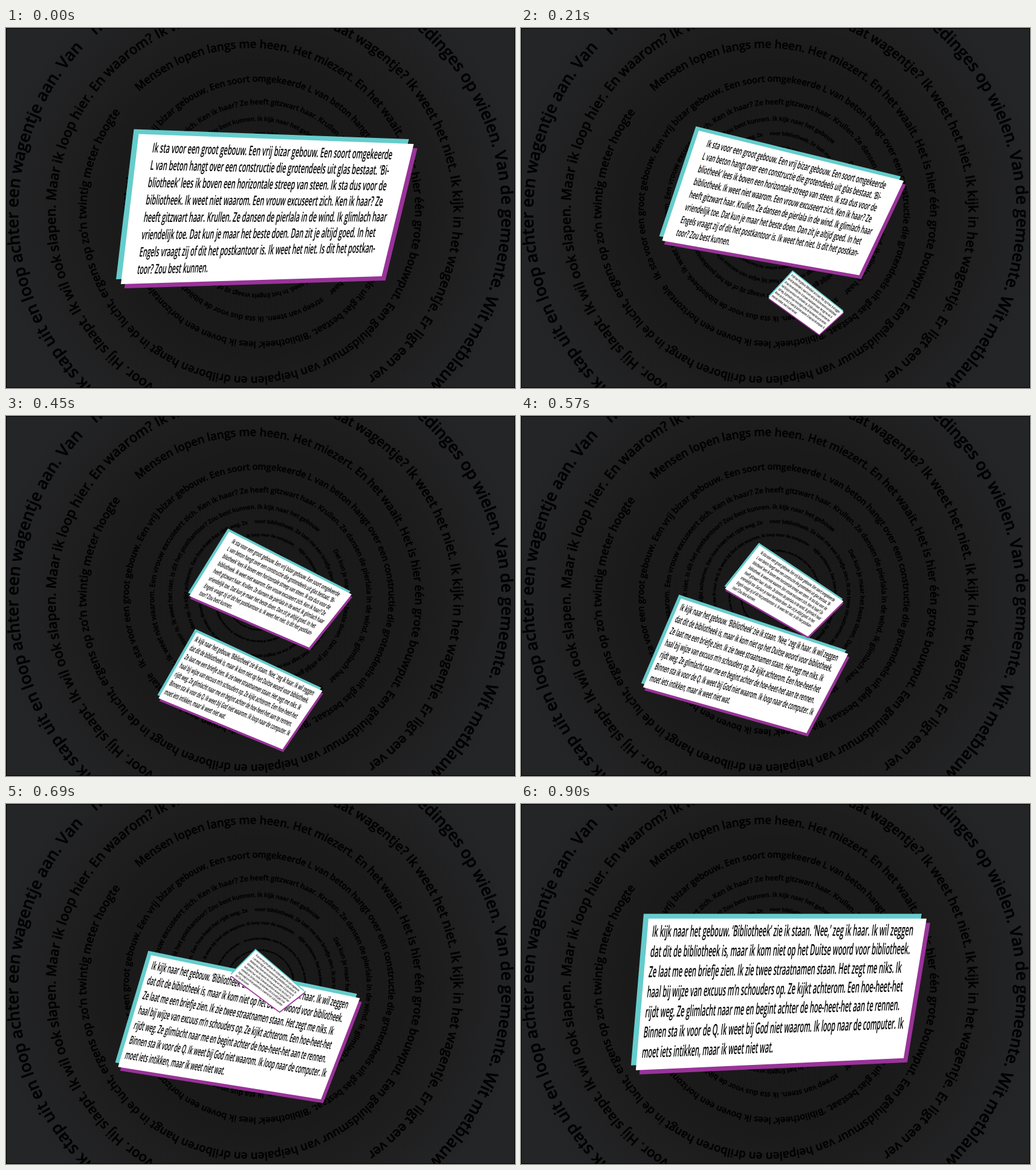
Animation, 842 px wide and 596 px high, one loop 0.93 s. Source, as an HTML page with a canvas:

```html
<!DOCTYPE html>
<html lang="nl">
<head>
<meta charset="utf-8">
<style>
  html, body { margin: 0; width: 100%; height: 100%; overflow: hidden; background: #1b1b1b; }
  canvas { display: block; }
</style>
</head>
<body>
<canvas id="stage" width="842" height="596"></canvas>
<script>
const W = 842, H = 596, STEP = 30, STEPS = 30, TURN = 50 * Math.PI / 180;
const FACE = '"Open Sans", "Noto Sans", sans-serif';
const stage = document.getElementById('stage').getContext('2d');
const backdrop = document.createElement('canvas');
backdrop.width = W;
backdrop.height = H;

const mix = (a, b, t) => a.map((v, i) => v + (b[i] - v) * t);

// Text along a circle; the font size follows from the arc (degrees) it fills.
function ring(ctx, cx, cy, r, from, to, text) {
  const chars = [...text], span = (to - from) * Math.PI / 180;
  ctx.font = `600 100px ${FACE}`;
  const widths = chars.map(c => ctx.measureText(c).width);
  const total = widths.reduce((a, b) => a + b, 0);
  ctx.font = `600 ${100 * span * r / total}px ${FACE}`;
  let done = 0;
  chars.forEach((c, i) => {
    const angle = from * Math.PI / 180 + span * (done + widths[i] / 2) / total;
    done += widths[i];
    ctx.setTransform(1, 0, 0, 1, cx + r * Math.cos(angle), cy + r * Math.sin(angle));
    ctx.rotate(angle + Math.PI / 2);
    ctx.fillText(c, 0, 0);
    ctx.strokeText(c, 0, 0);
  });
  ctx.resetTransform();
}

function paintBackdrop() {
  const ctx = backdrop.getContext('2d');
  const glow = ctx.createRadialGradient(420, 300, 0, 420, 300, 440);
  glow.addColorStop(0, '#191919');
  glow.addColorStop(0.55, '#1b1a1a');
  glow.addColorStop(0.8, '#202021');
  glow.addColorStop(1, '#242527');
  ctx.fillStyle = glow;
  ctx.fillRect(0, 0, W, H);
  ctx.strokeRect(0.5, 0.5, W - 1, H - 1);
  ctx.fillStyle = '#000';
  ctx.lineWidth = 0.4;
  ctx.textAlign = 'center';
  ctx.textBaseline = 'middle';
  ring(ctx, 420, 306, 407, 134, 229.6, 'Ik stap uit en loop achter een wagentje aan. Van    n');
  ring(ctx, 420, 306, 407, -49.7, 45.5, 'edinges op wielen. Van de gemeente. Wit metblauw');
  ring(ctx, 411, 306, 335, 120.2, 248.5, 'voor. Hij slaapt. Ik wil ook slapen. Maar ik loop hier. En waarom? Ik w');
  ring(ctx, 411, 306, 335, -70.7, 55.5, 'is dat wagentje? Ik weet het niet. Ik kijk in het wagentje. Er ligt een ver');
  ring(ctx, 405, 305, 277, 227.2, 577.6, 'Mensen lopen langs me heen. Het miezert. En het waait. Het is hier één grote bouwput. Een geluidsmuur van heipalen en drilboren hangt in de lucht, ergens op zo’n twintig meter hoogte');
  ring(ctx, 418, 304, 219, 149.5, 506, 'Ik sta voor een groot gebouw. Een vrij bizar gebouw. Een soort omgekeerde L van beton hangt over een constructie die grotendeels uit glas bestaat. ‘Bibliotheek’ lees ik boven een horizontale');
  ring(ctx, 421, 302, 179, 55, 410, 'streep van steen. Ik sta dus voor de bibliotheek. Ik weet niet waarom. Een vrouw excuseert zich. Ken ik haar? Ze heeft gitzwart haar. Krullen. Ze dansen de pierlala in de wind. Ik glimlach haar');
  ring(ctx, 418, 297, 146, -31, 313, 'Dat kun je maar het beste doen. Dan zit je altijd goed. In het Engels vraagt zij of dit het postkantoor is. Ik weet het niet. Is dit het postkantoor? Zou best kunnen. Ik kijk naar het gebouw');
  ring(ctx, 420, 297, 122, 266, 620.5, 'voor bibliotheek. Ze laat me een briefje zien. Ik zie twee straatnamen staan. Het zegt me niks. Ik haal bij wijze van excuus m’n schouders op. Ze kijkt achterom. Een hoe-heet-het rijdt weg. Ze');
  ring(ctx, 420, 297, 100, -50, 305, 'kijkt achterom. Een hoe-heet-het rijdt weg. Ze glimlacht naar me en begint achter de hoe-heet-het aan te rennen. Binnen sta ik voor de Q. Ik weet bij God niet waarom. Ik loop naar de computer.');
  const typing = 'Ik moet iets intikken, maar ik weet niet wat. Ik loop naar de computer. ';
  ring(ctx, 420, 298, 75, 250, 605, typing.repeat(3));
  ring(ctx, 420, 298, 56, 200, 555, typing.repeat(3));
}

// quad: top left, top right, bottom right, bottom left. column: left and right share of the width.
// path: places of the middle four steps apart, from step -5 on.
const first = {
  quad: [[219, 175.5], [674, 192], [621, 411], [189.5, 424]],
  path: [[424.5, 305], [426, 301.3], [427.7, 298.7], [430, 296.1], [433.5, 293.8], [436.3, 292],
    [435, 292.9], [432.8, 295.2], [430, 298], [428, 301], [426, 304]],
  column: [0.056, 0.967], baseline: 0.12, leading: 0.1165, size: 22,
  lines: [
    'Ik sta voor een groot gebouw. Een vrij bizar gebouw. Een soort omgekeerde',
    'L van beton hangt over een constructie die grotendeels uit glas bestaat. ‘Bi-',
    'bliotheek’ lees ik boven een horizontale streep van steen. Ik sta dus voor de',
    'bibliotheek. Ik weet niet waarom. Een vrouw excuseert zich. Ken ik haar? Ze',
    'heeft gitzwart haar. Krullen. Ze dansen de pierlala in de wind. Ik glimlach haar',
    'vriendelijk toe. Dat kun je maar het beste doen. Dan zit je altijd goed. In het',
    'Engels vraagt zij of dit het postkantoor is. Ik weet het niet. Is dit het postkan-',
    'toor? Zou best kunnen.'
  ]
};
const second = {
  quad: [[211, 189], [671, 189], [633, 420], [190, 440]],
  path: [[540, 348], [527, 390], [503, 427], [471.5, 457], [429, 470.5], [387, 458],
    [370, 417.5], [383, 374], [406, 336.5], [433, 301.5], [460, 266]],
  column: [0.017, 0.98], baseline: 0.12, leading: 0.1333, size: 25.5,
  lines: [
    'Ik kijk naar het gebouw. ‘Bibliotheek’ zie ik staan. ‘Nee,’ zeg ik haar. Ik wil zeggen',
    'dat dit de bibliotheek is, maar ik kom niet op het Duitse woord voor bibliotheek.',
    'Ze laat me een briefje zien. Ik zie twee straatnamen staan. Het zegt me niks. Ik',
    'haal bij wijze van excuus m’n schouders op. Ze kijkt achterom. Een hoe-heet-het',
    'rijdt weg. Ze glimlacht naar me en begint achter de hoe-heet-het aan te rennen.',
    'Binnen sta ik voor de Q. Ik weet bij God niet waarom. Ik loop naar de computer. Ik',
    'moet iets intikken, maar ik weet niet wat.'
  ]
};

// Catmull-Rom curve through the waypoints.
function along(path, step) {
  const k = (step + 5) / 4, i = Math.floor(k), u = k - i;
  return [0, 1].map(axis => {
    const [a, b, c, d] = path.slice(i - 1, i + 3).map(p => p[axis]);
    return b + u * (c - a + u * (2 * a - 5 * b + 4 * c - d + u * (3 * (b - c) + d - a))) / 2;
  });
}

function fillQuad(quad, color, dx, dy) {
  stage.fillStyle = color;
  stage.beginPath();
  quad.forEach(([x, y]) => stage.lineTo(x + dx, y + dy));
  stage.fill();
}

function drawCard(card, step, scale) {
  if (scale <= 0) return;
  const { quad: [tl, tr, br, bl], column, lines } = card;
  const top = mix(tl, tr, 0.5), bottom = mix(bl, br, 0.5), middle = mix(top, bottom, 0.5);
  stage.save();
  stage.translate(...along(card.path, step));
  stage.rotate(TURN * (1 - scale));
  stage.scale(scale, scale);
  stage.translate(-middle[0], -middle[1]);
  fillQuad(card.quad, '#993399', 6, 7);
  fillQuad(card.quad, '#66cccc', -8, -8);
  fillQuad(card.quad, '#fff', 0, 0);

  stage.fillStyle = '#000';
  stage.font = `600 ${card.size}px ${FACE}`;
  const width = Math.max(...lines.map(line => stage.measureText(line).width));
  const slant = (bottom[0] - top[0]) / (bottom[1] - top[1]);
  lines.forEach((line, i) => {
    const v = card.baseline + i * card.leading;
    const left = mix(tl, bl, v), right = mix(tr, br, v);
    const [px, py] = mix(left, right, column[0]);
    const [qx, qy] = mix(left, right, column[1]);
    stage.save();
    stage.transform((qx - px) / width, (qy - py) / width, slant, 1, px, py);
    stage.fillText(line, 0, 0);
    stage.restore();
  });
  stage.restore();
}

function render(now) {
  const step = Math.floor(now / STEP) % (STEPS + 1), t = step / STEPS;
  stage.drawImage(backdrop, 0, 0);
  drawCard(second, step, t);
  drawCard(first, step, 1 - t);
}

function tick() {
  render(performance.now());
  requestAnimationFrame(tick);
}

paintBackdrop();
tick();
</script>
</body>
</html>
```
